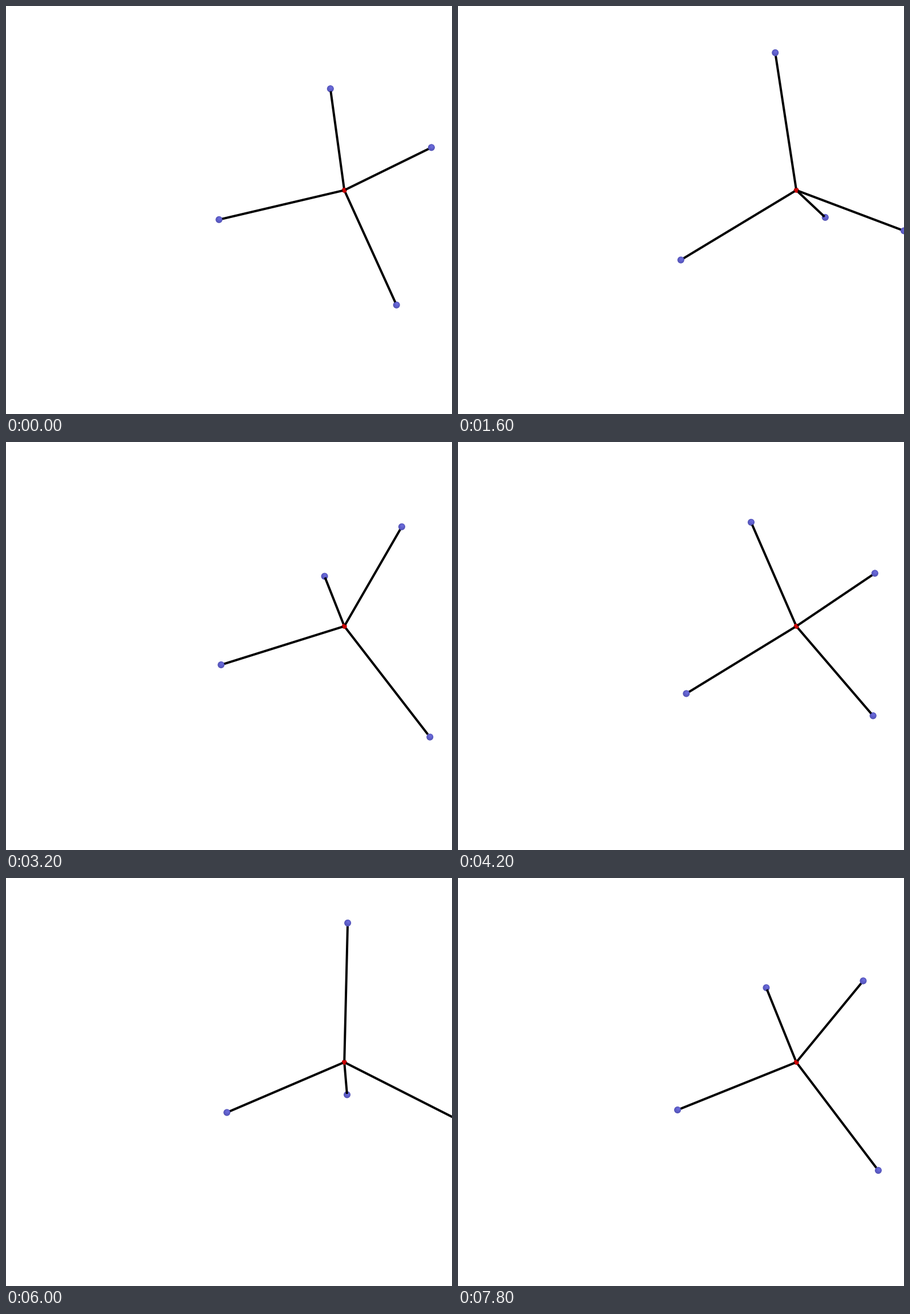
Animation of 782 by 716 pixels, one loop 8 s. Source, as a matplotlib script:

```python
import numpy as np
import matplotlib.pyplot as plt
from matplotlib.animation import FuncAnimation
from matplotlib.patches import Circle

W, H, DPI = 782, 716, 64
FRAMES, STEP_MS = 40, 200
CENTER = np.array([593.2, 323.3])
BOND = 245.8          # distance from the hub to each ball
BALL, HUB = 6.0, 4.5  # radii in pixels
LINE = 4.0
PHASE, SPIN = np.radians(74.6), 0.1

# Screen axes: x right, y down, z towards the viewer.
AXIS = np.array([-0.833, 0.374, 0.407])
AXIS /= np.linalg.norm(AXIS)
UP = np.array([0, -1, 0]) + AXIS[1] * AXIS
UP /= np.linalg.norm(UP)
SIDE = np.cross(AXIS, UP)

# Wobble of the spin axis in pixels: frame, along UP, along SIDE
WOBBLE = np.array([
    (0, 42, -9), (6, 0, -12), (8, -34.5, -29), (12, -24, -18),
    (15, 42, -7), (16, 25.5, -9), (18, 4, 2), (21, -29, 1.6),
    (24, 6, 8), (27, 2, 5.3), (29, 8, -1), (31, 0, 2),
    (34, -4.5, 0.8), (36, -8, 0), (39, 8.8, -1.4),
])


def turn(v, axis, angle):
    """Rotate v about a unit axis (Rodrigues)."""
    c, s = np.cos(angle), np.sin(angle)
    return v * c + np.cross(axis, v) * s + axis * (axis @ v) * (1 - c)


def vertices(n):
    """Four corners of the tetrahedron at frame n."""
    up = np.interp(n, WOBBLE[:, 0], WOBBLE[:, 1])
    side = np.interp(n, WOBBLE[:, 0], WOBBLE[:, 2])
    lean = (up * UP + side * SIDE) / BOND
    size = np.linalg.norm(lean)
    pivot = np.cross(AXIS, lean / size) if size > 1e-9 else UP
    tilt = np.arcsin(min(size, 1))
    corners = [AXIS]
    for k in range(3):
        a = PHASE + SPIN * n + k * 2 * np.pi / 3
        ring = np.cos(a) * UP + np.sin(a) * SIDE
        corners.append(-AXIS / 3 + np.sqrt(8) / 3 * ring)
    return [BOND * turn(v, pivot, tilt) for v in corners]


fig = plt.figure(figsize=(W / DPI, H / DPI), dpi=DPI, facecolor="white")
ax = fig.add_axes([0, 0, 1, 1])
ax.set_xlim(0, W)
ax.set_ylim(H, 0)
ax.axis("off")


class Ball:
    """A small shaded sphere made of nested discs."""

    LAYERS = ((1.0, 0, "#5252b4"), (0.86, 0.09, "#5c5cc6"), (0.5, 0.26, "#6868d6"))

    def __init__(self):
        self.discs = [ax.add_patch(Circle((0, 0), BALL * f, fc=c, lw=0))
                      for f, _, c in self.LAYERS]

    def place(self, xy, order):
        for i, (disc, (_, off, _)) in enumerate(zip(self.discs, self.LAYERS)):
            disc.center = (xy[0] + off * BALL * 0.6, xy[1] - off * BALL)
            disc.set_zorder(order + 0.1 * i)


balls = [Ball() for _ in range(4)]
bonds = [ax.plot([], [], color="black", lw=LINE * 72 / DPI,
                 solid_capstyle="butt")[0] for _ in range(4)]
ax.add_patch(Circle(CENTER, HUB, fc="#c80000", lw=0, zorder=3))


def draw(n):
    for v, ball, bond in zip(vertices(n), balls, bonds):
        near = v[2] > 0
        # bonds show only between the surfaces of hub and ball
        start = HUB * 0.8 / BOND if near else 0
        end = 1 if near else 1 - BALL / BOND
        pts = CENTER + np.outer([start, end], v[:2])
        bond.set_data(pts[:, 0], pts[:, 1])
        bond.set_zorder(4 if near else 2)
        ball.place(CENTER + v[:2], 5 if near else 1)
    return []


anim = FuncAnimation(fig, draw, frames=FRAMES, interval=STEP_MS,
                     init_func=lambda: draw(0), repeat=True, repeat_delay=0)
plt.show()
```
